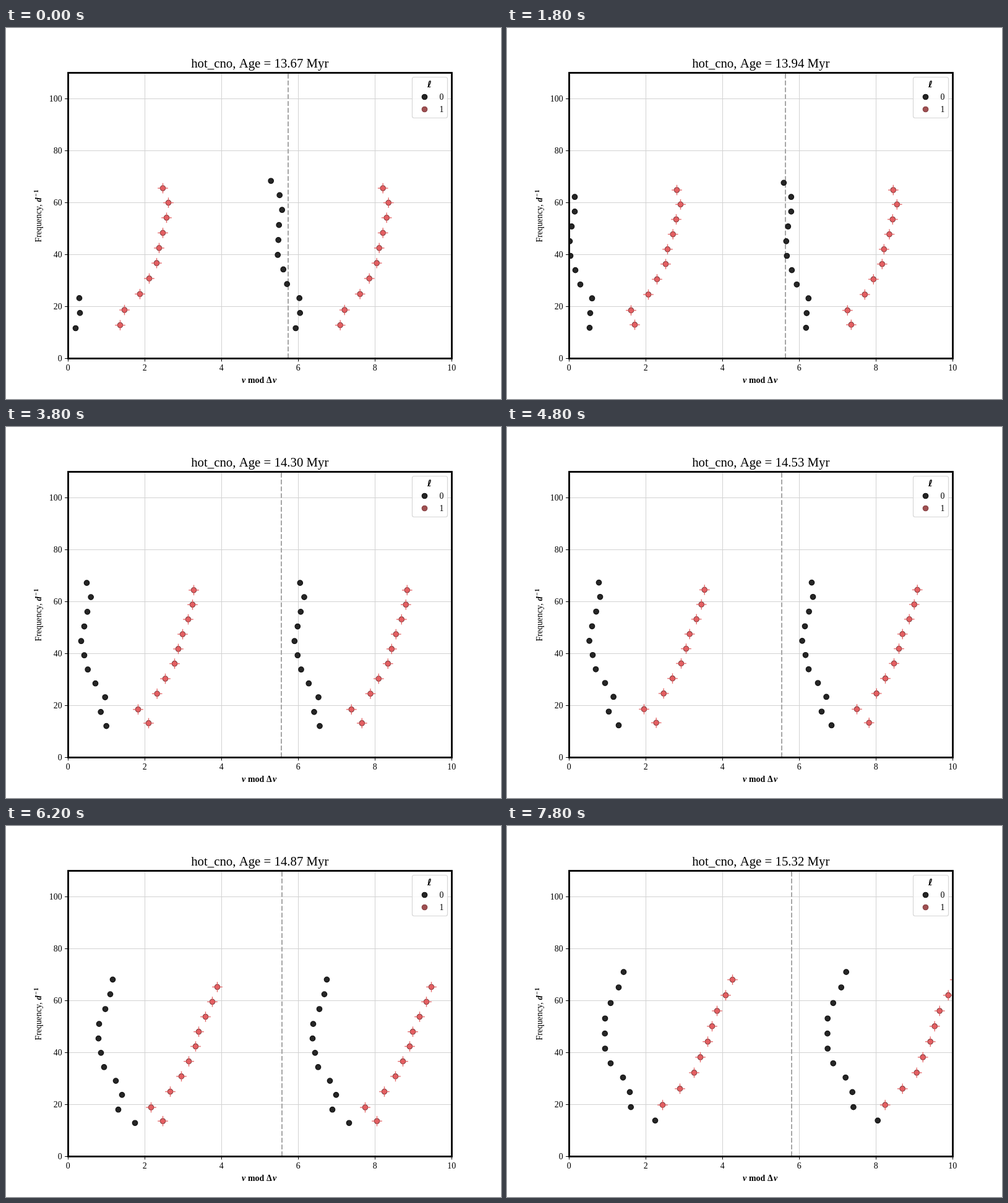
Animation, 800 px wide and 600 px high, one loop 8 s. Source, as an HTML page with a canvas:

```html
<!DOCTYPE html>
<html lang="en">
<head>
<meta charset="utf-8">
<title>Echelle diagram</title>
<style>
html, body { margin: 0; width: 100%; height: 100%; overflow: hidden; background: #fff; }
canvas { display: block; }
</style>
</head>
<body>
<canvas id="stage" width="800" height="600"></canvas>
<script>
const ctx = document.getElementById('stage').getContext('2d');
const SERIF = '"Liberation Serif", "Times New Roman", serif';
const STEP = 200, STEPS = 40;
const X0 = 100, Y0 = 534, W = 620, H = 462;
const UNIT = 62;    // pixels per unit on x
const FREQ = 4.2;   // pixels per unit on y
const LAST_LOW = 36; // the lowest l = 1 mode is absent from this step on

const ageSteps = [0, 9, 15, 19, 24, 31, 39];
const ages = [13.67, 13.94, 14.15, 14.30, 14.53, 14.87, 15.32];
const spacings = [355.7, 349.8, 346.1, 344.8, 344, 346, 359.7];

// Mode offsets in pixels, lowest radial order first, one row per key step
const modeSteps = [0, 9, 19, 24, 31, 39];
const radial = [
  [12, 19, 18, -2, -8, -17, -16, -15, -10, -14, -28],
  [33, 34, 37, 18, 10, 2, 1, 4, 9, 9, -3],
  [61.7, 52.7, 59.7, 44, 31.7, 26, 21, 26, 31, 36.7, 30],
  [80, 64, 71.6, 58, 43, 38, 32.6, 37, 43.6, 50, 48],
  [108, 81, 87, 77, 58, 53, 49, 50, 60, 68, 72],
  [139, 99.7, 98, 87, 67, 58, 57.7, 58, 67, 80, 88]
];
const dipole = [
  [84, 91, 116, 131, 143, 147, 153, 159, 162, 153],
  [106, 100, 128, 142, 156, 159, 167.7, 173, 180, 174],
  [130, 113, 143.7, 157, 172, 178, 185, 194, 201, 203],
  [140.7, 121, 152.7, 167, 181, 189, 194.7, 205.7, 213.7, 218.7],
  [153, 134, 165, 183, 195, 206, 211, 222, 233, 241],
  [166, 151, 179, 202, 212, 224, 231, 239, 253, 264]
];

// Cubic Hermite curve with parabolic slopes
function curve(xs, ys, x) {
  const last = xs.length - 1;
  const rise = i => (ys[i + 1] - ys[i]) / (xs[i + 1] - xs[i]);
  const slope = i => {
    if (i === 0) return 2 * rise(0) - slope(1);
    if (i === last) return 2 * rise(last - 1) - slope(last - 1);
    const a = xs[i] - xs[i - 1], b = xs[i + 1] - xs[i];
    return (rise(i - 1) * b + rise(i) * a) / (a + b);
  };
  let i = 0;
  while (i < last - 1 && x > xs[i + 1]) i++;
  const h = xs[i + 1] - xs[i], u = (x - xs[i]) / h, v = 1 - u;
  return ys[i] * v * v * (1 + 2 * u) + ys[i + 1] * u * u * (1 + 2 * v)
    + h * u * v * (v * slope(i) - u * slope(i + 1));
}

function text(str, x, y, size, align = 'left', style = '', family = SERIF) {
  ctx.font = `${style} ${size}px ${family}`;
  ctx.textAlign = align;
  ctx.fillStyle = '#000';
  ctx.fillText(str, x, y);
}

function disc(x, y, r, fill, edge) {
  ctx.beginPath();
  ctx.arc(x, y, r, 0, 2 * Math.PI);
  ctx.fillStyle = fill;
  ctx.fill();
  if (edge) {
    ctx.strokeStyle = edge;
    ctx.lineWidth = 1.39;
    ctx.stroke();
  }
}

const blackDot = (x, y) => disc(x, y, 4.17, '#262626', '#141414');
const brownDot = (x, y) => disc(x, y, 4.17, '#a05052', '#8a4446');

function redDot(x, y) {
  disc(x, y, 4.17, '#a05052', '#8a4446');
  ctx.fillStyle = 'rgba(226, 84, 86, 0.85)';
  ctx.fillRect(x - 8.3, y - 0.7, 16.6, 1.4);
  ctx.fillRect(x - 0.7, y - 8.3, 1.4, 16.6);
  disc(x, y, 3.5, '#e45f62');
}

function drawModes(rows, step, gap, dot, first) {
  for (let k = first; k < rows[0].length; k++) {
    const raw = curve(modeSteps, rows.map(row => row[k]), step);
    const y = Y0 - (raw + (k + 2) * gap) / UNIT * FREQ;
    const x = X0 + (raw + gap) % gap;
    dot(x + 0.5, y + 0.5);
    dot(x + gap + 0.5, y + 0.5);
  }
}

function drawGrid() {
  ctx.fillStyle = '#d2d2d2';
  for (let v = 2; v < 10; v += 2) ctx.fillRect(X0 + v * UNIT, Y0 - H, 1, H);
  for (let f = 20; f <= 100; f += 20) ctx.fillRect(X0, Y0 - f * FREQ, W, 1);
}

function drawAxes() {
  ctx.strokeStyle = '#000';
  ctx.lineWidth = 2.8;
  ctx.strokeRect(X0 + 0.5, Y0 - H + 0.5, W, H);
  for (let v = 0; v <= 10; v += 2) {
    const x = X0 + v * UNIT;
    text(v, x + 0.2, 554, 13.89, 'center');
    ctx.fillRect(x, Y0, 1, 5.4);
  }
  for (let f = 0; f <= 100; f += 20) {
    const y = Y0 - f * FREQ;
    text(f, 90.6, y + 5, 13.89, 'right');
    ctx.fillRect(95, y, 5, 1);
  }
}

function drawLabels() {
  text('ν', 381, 574, 13.89, 'left', 'italic bold');
  text('mod', 391, 574, 13.89, 'left', 'bold');
  text('Δ', 421, 574, 13.89, 'left', 'bold');
  text('ν', 431, 574, 13.89, 'left', 'italic bold');
  ctx.save();
  ctx.translate(57, 346.5);
  ctx.rotate(-Math.PI / 2);
  text('Frequency,', 0, 0, 13.89);
  text('d', 65.3, 0, 13.89, 'left', 'italic bold');
  text('−', 73.6, -5, 9.72, 'left', 'bold');
  text('1', 80, -5, 9.72, 'left', 'bold');
  ctx.restore();
}

function drawLegend() {
  ctx.beginPath();
  ctx.roundRect(656.5, 79.5, 57, 66, 3);
  ctx.fillStyle = 'rgba(255, 255, 255, 0.8)';
  ctx.fill();
  ctx.strokeStyle = '#d6d6d6';
  ctx.lineWidth = 1.2;
  ctx.stroke();
  text('ℓ', 684.5, 96, 14.5, 'center', 'italic bold', '"DejaVu Sans", sans-serif');
  blackDot(676.5, 111.5);
  brownDot(676.5, 131.5);
  text('0', 704, 116, 13.89, 'center');
  text('1', 704, 136, 13.89, 'center');
}

function draw(step) {
  const gap = curve(ageSteps, spacings, step);
  const age = curve(ageSteps, ages, step);
  ctx.fillStyle = '#fff';
  ctx.fillRect(0, 0, 800, 600);

  ctx.save();
  ctx.beginPath();
  ctx.rect(X0, Y0 - H, W, H);
  ctx.clip();
  drawGrid();
  ctx.setLineDash([7.7, 3.33]);
  ctx.strokeStyle = '#a6a6a6';
  ctx.lineWidth = 2;
  ctx.beginPath();
  const x = Math.round(X0 + gap);
  ctx.moveTo(x, Y0);
  ctx.lineTo(x, Y0 - H);
  ctx.stroke();
  ctx.setLineDash([]);
  drawModes(radial, step, gap, blackDot, 0);
  drawModes(dipole, step, gap, redDot, step < LAST_LOW ? 0 : 1);
  ctx.restore();

  drawAxes();
  drawLabels();
  drawLegend();
  text(`hot_cno, Age = ${age.toFixed(2)} Myr`, 410.3, 64, 20.83, 'center');
}

const start = performance.now();
function tick() {
  const t = Math.max(0, performance.now() - start);
  draw(Math.floor(t / STEP) % STEPS);
  requestAnimationFrame(tick);
}
tick();
</script>
</body>
</html>
```
